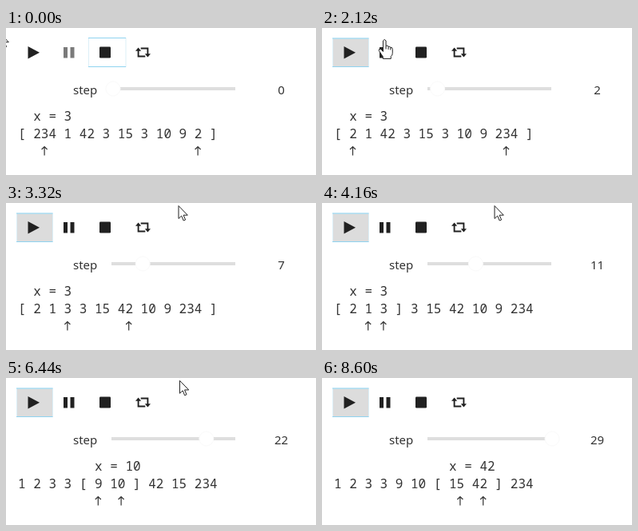
Recreate the animation shown at these times as an HTML page. Size 388 by 184 pixels, loop 9440 ms.

```html
<!DOCTYPE html>
<html lang="en">
<head>
<meta charset="utf-8">
<title>Quicksort steps</title>
<style>
html, body { margin: 0; width: 100%; height: 100%; overflow: hidden; background: #fff; }
svg { display: block; width: 388px; height: 184px; }
text { font: 300 15px "Noto Sans", "Open Sans", sans-serif; fill: #333; white-space: pre; }
.mono { font: 300 16px "Noto Sans Mono", "DejaVu Sans Mono", monospace; }
.edge { fill: none; stroke: #8fd3f0; }
.side { stroke: #dceff7; }
.icon { fill: #212121; }
</style>
</head>
<body>
<svg viewBox="0 0 388 184">
  <defs>
    <g id="half">
      <path d="M165.600 28v7.500h8.700" fill="none" stroke="#212121" stroke-width="1.900"/>
      <path class="icon" d="M162 28.800l3.600-4.200 3.600 4.200z"/>
    </g>
    <path id="up" d="M0 159.500V148.500M-3.500 152L0 148.500 3.500 152" fill="none" stroke="#333" stroke-width="1.200"/>
  </defs>

  <g id="pressed">
    <rect class="side" x="13.500" y="13" width="45" height="35.500" fill="#dcdcdc"/>
    <path class="edge" d="M13 13h45.500M13 48.500h45.500"/>
  </g>
  <path id="hover" d="M17 49h40" stroke="#c4c4c4" stroke-width="1.500"/>
  <g id="focus">
    <rect class="side" x="103.500" y="12.500" width="46.500" height="36" fill="#fff"/>
    <path class="edge" d="M103 12.500h47M103 48.500h47"/>
  </g>
  <path class="icon" d="M27.500 23L42 30.700 27.500 38.500z"/>
  <path id="pause" d="M72 24h5v13.500h-5zM80.500 24h5v13.500h-5z"/>
  <rect class="icon" x="117" y="23.500" width="14" height="14" rx="1.200"/>
  <use href="#half"/>
  <use href="#half" transform="rotate(180 171.500 30.500)"/>

  <text x="84" y="82.500">step</text>
  <rect x="132" y="74" width="155" height="4" fill="#dedede"/>
  <circle id="knob" cy="76" r="9" fill="#fff" stroke="#fafafa"/>
  <text id="count" x="344.500" y="82.500" text-anchor="middle"></text>

  <text id="pivot" class="mono" y="116"></text>
  <text id="list" class="mono" x="15" y="137.500"></text>
  <use id="left" href="#up"/>
  <use id="right" href="#up"/>

  <g id="cursor" fill="#fff" stroke="#222" stroke-linejoin="round">
    <path id="arrow" d="M0 0V16L3.700 12.600 6.200 18.500 8.600 17.500 6.100 11.700H11.300z"/>
    <path id="hand" d="M-1.800 1.500Q0-1.500 1.800 1.500V8Q4 6.500 4.800 9 7 8 7.500 10 10 9.500 10 12V17Q10 20 8 21V24H-2V21.500L-7 14Q-7.500 11-4.500 12L-1.800 15zM1.800 8v4M4.800 9v3.500M7.500 10v3"/>
  </g>
</svg>
<script>
const LOOP = 9440, PRESS = 1720, CHAR = 9.6, START = 15;
const $ = id => document.getElementById(id);

const data = [234, 1, 42, 3, 15, 3, 10, 9, 2];
const pivots = [3, 3, 2, 10, 10, 234, 42];
const holds = [1, 13, 15, 24]; // steps that repeat the preceding state
const states = [];

function sort(lo, hi) {
  if (lo >= hi) return;
  const x = pivots.shift();
  let i = lo, j = hi;
  const save = () => {
    do states.push({ a: [...data], lo, hi, i, j, x });
    while (holds.includes(states.length));
  };
  while (i <= j) {
    save();
    while (data[i] < x) { i++; save(); }
    while (data[j] > x) { j--; save(); }
    if (i < j) {
      [data[i], data[j]] = [data[j], data[i]];
      save();
    }
    i++;
    j--;
  }
  sort(lo, j);
  sort(i, hi);
}
sort(0, data.length - 1);

// Steady ticks that slow down towards the end
const tick = n => 1690 + 212 * n + 6.4 * Math.max(0, n - 20) ** 2;

function stepAt(t) {
  let n = 0;
  while (n < states.length - 1 && tick(n + 1) <= t) n++;
  return n;
}

// Time and tip of the mouse pointer
const path = [[0, -8, 6], [360, 140, 87], [720, 140, 87], [1320, 42, 17],
  [1920, 42, 17], [2560, 197, 6], [2760, 216, 3.5], [6400, 216, 3.5], [7100, 362, -24]];

function pointer(t) {
  const n = path.findIndex(p => p[0] > t);
  if (n < 0) return path[path.length - 1].slice(1);
  const [t0, x0, y0] = path[n - 1], [t1, x1, y1] = path[n];
  const k = (t - t0) / (t1 - t0), e = k * k * (3 - 2 * k);
  return [x0 + (x1 - x0) * e, y0 + (y1 - y0) * e];
}

const show = (id, on) => $(id).setAttribute("visibility", on ? "visible" : "hidden");
const move = (id, x, y) => $(id).setAttribute("transform", `translate(${x} ${y})`);

function drawList({ a, lo, hi, i, j, x }) {
  let text = "", first = 0;
  const mid = [];
  a.forEach((v, k) => {
    if (k === lo) {
      text += "[ ";
      first = text.length;
    }
    const s = String(v);
    mid[k] = START + CHAR * (text.length + (s.length >> 1) + 0.5) - 0.5;
    text += s + (k === hi ? " ] " : " ");
  });
  $("list").textContent = text;
  $("pivot").textContent = "x = " + x;
  $("pivot").setAttribute("x", START + CHAR * first);
  move("left", mid[i], 0);
  move("right", mid[j], 0);
}

function draw(t) {
  const step = stepAt(t);
  drawList(states[step]);
  $("count").textContent = step;
  $("knob").setAttribute("cx", 134 + 5.31 * step);

  const playing = t >= PRESS;
  const [x, y] = pointer(t);
  const overBar = x > 13 && x < 188 && y > 12 && y < 50;
  show("pressed", playing);
  show("focus", !playing);
  show("hover", !playing && overBar && x < 58);
  $("pause").setAttribute("fill", playing ? "#212121" : "#7a7a7a");
  move("cursor", x, y);
  show("hand", overBar);
  show("arrow", !overBar);
}

const begin = performance.now();
function frame() {
  draw((performance.now() - begin) % LOOP);
  requestAnimationFrame(frame);
}
frame();
</script>
</body>
</html>
```
